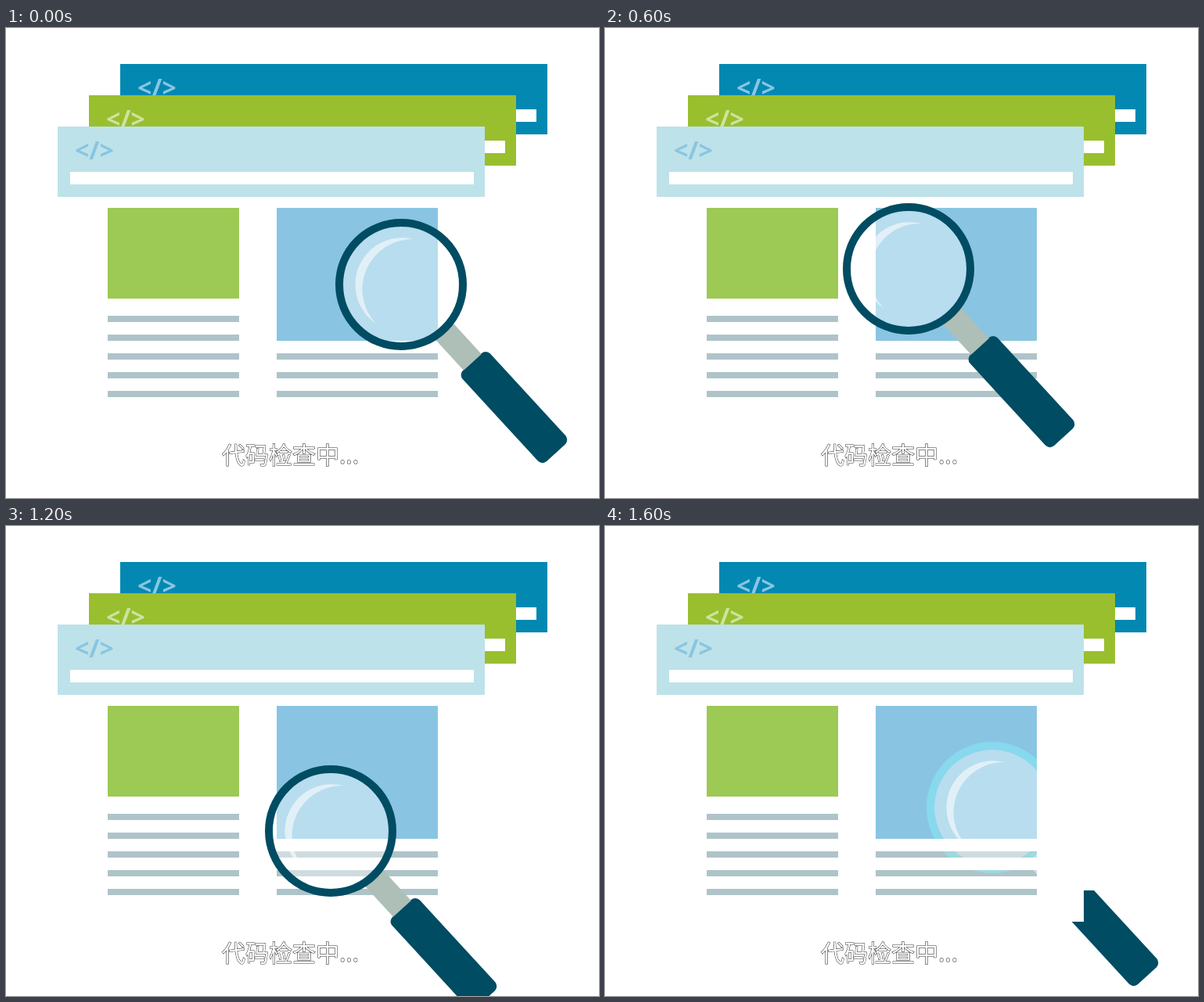
An HTML page for the animation above (1.8 s loop, 758 by 601 pixels).

```html
<!DOCTYPE html>
<html lang="zh">
<head>
<meta charset="utf-8">
<title>代码检查中</title>
<style>
  html, body { margin: 0; width: 100%; height: 100%; overflow: hidden; background: #fff; }
  svg { display: block; }
  .tag { font: bold 32px "Open Sans", "Noto Sans", sans-serif; }
  .caption {
    font: 30px "Noto Sans CJK SC", "Noto Sans CJK", sans-serif;
    fill: #fff; stroke: #333; stroke-width: 1px; paint-order: stroke;
  }
  .ring { fill: none; stroke: #004c63; stroke-width: 10; }
  .neck { fill: #adbfb7; }
  .grip { fill: #004c63; }
  .faded .ring { stroke: #86f5ff; stroke-opacity: .4; }
  .faded .neck { fill: #fff; fill-opacity: .4; }
  .faded .glass { clip-path: url(#page-clip); }
  .faded .handle { clip-path: url(#grip-clip); }
</style>
</head>
<body>
<svg width="758" height="601" viewBox="0 0 758 601">
  <defs>
    <clipPath id="page-clip"></clipPath>
    <clipPath id="grip-clip"><path d="M612 466H758V601H0V506H612Z"/></clipPath>
  </defs>
  <g id="panels"></g>
  <g id="page"></g>
  <text class="caption" x="276" y="557">代码检查中...</text>
  <g id="magnifier">
    <g class="handle"><g class="mover">
      <rect class="grip" x="134.4" y="-24" width="158" height="48" rx="8" transform="rotate(47.4)"/>
    </g></g>
    <g class="glass"><g class="mover">
      <rect class="neck" x="82" y="-15.5" width="53" height="31" transform="rotate(47.4)"/>
      <circle r="74" fill="#fff" fill-opacity=".4"/>
      <path d="M16-58A60 60 0 0 0-32 50A64 64 0 0 1 16-58Z" fill="#fff" fill-opacity=".58"/>
      <circle class="ring" r="79"/>
    </g></g>
  </g>
</svg>
<script>
  const byId = id => document.getElementById(id);

  function add(parent, name, attrs, text = "") {
    const node = document.createElementNS("http://www.w3.org/2000/svg", name);
    for (const key in attrs) node.setAttribute(key, attrs[key]);
    node.textContent = text;
    parent.append(node);
  }

  const addRect = (parent, x, y, width, height, fill) =>
    add(parent, "rect", { x, y, width, height, fill });

  function addPanel(x, y, fill, tagFill) {
    const panels = byId("panels");
    addRect(panels, x, y, 546, 90, fill);
    add(panels, "text", { class: "tag", x: x + 22, y: y + 42, fill: tagFill }, "</>");
    addRect(panels, x + 16, y + 58, 516, 16, "#fff");
  }

  addPanel(146, 46, "#0388b2", "#89c5e2");
  addPanel(106, 86, "#99bf2f", "#cde3a0");
  addPanel(66, 126, "#bde2e9", "#89c5e2");

  // The page shapes also bound the faded lens.
  for (const parent of [byId("page"), byId("page-clip")]) {
    addRect(parent, 130, 230, 168, 116, "#9dc955");
    addRect(parent, 346, 230, 206, 170, "#89c5e2");
    for (let y = 368; y <= 464; y += 24) {
      addRect(parent, 130, y, 168, 8, "#aec4c9");
      if (y >= 416) addRect(parent, 346, y, 206, 8, "#aec4c9");
    }
  }

  // Start time in ms, lens centre x and y
  const steps = [
    [0, 505, 328], [400, 465, 288], [600, 388, 308], [800, 365, 328],
    [1000, 375, 368], [1200, 415, 390], [1400, 465, 390], [1600, 495, 360]
  ];
  const loop = 1800;
  const magnifier = byId("magnifier");
  const movers = document.querySelectorAll(".mover");

  function draw(now) {
    const time = now % loop;
    const [start, x, y] = steps.findLast(step => step[0] <= time);
    for (const mover of movers) mover.setAttribute("transform", `translate(${x} ${y})`);
    magnifier.classList.toggle("faded", start === 1600);
  }

  const origin = performance.now();
  function tick() {
    draw(performance.now() - origin);
    requestAnimationFrame(tick);
  }
  tick();
</script>
</body>
</html>
```
